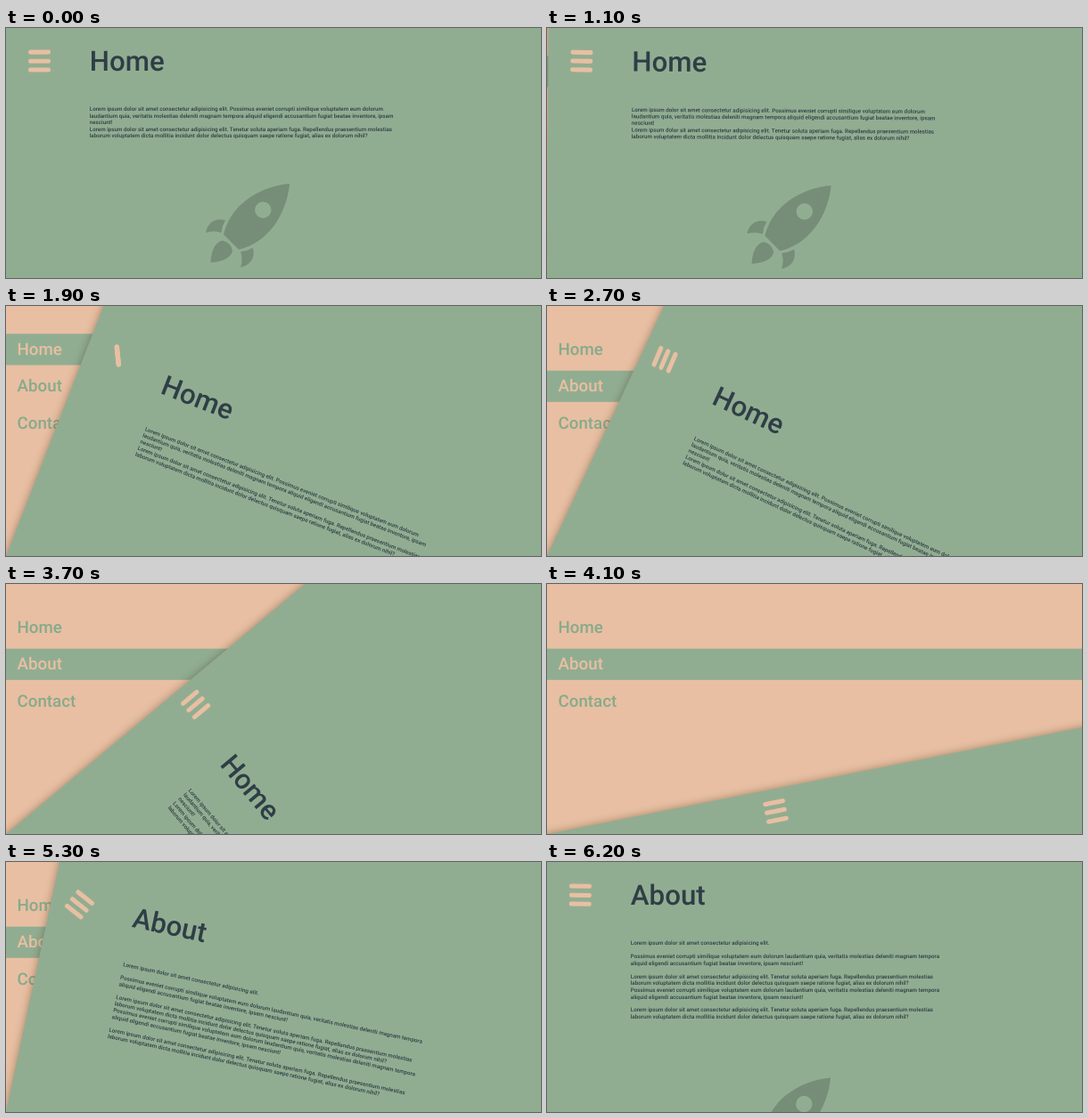
Animation of 600 by 281 pixels, one loop 6.3 s. Source, as an HTML page:

```html
<!DOCTYPE html>
<html lang="en">
<head>
<meta charset="utf-8">
<title>Rotating page menu</title>
<style>
:root { --green: #91ad91; --peach: #e8bfa2; --ink: #2f3e46; }
html, body { margin: 0; width: 100%; height: 100%; overflow: hidden; background: var(--peach); }
#stage {
  position: absolute; left: 0; top: 0; width: 1536px; height: 720px; overflow: hidden;
  transform: scale(.390625); transform-origin: 0 0; background: var(--peach);
  font: 500 16px/1.2 Roboto, sans-serif; text-rendering: geometricPrecision;
}
nav { position: absolute; top: 80px; left: 0; width: 100%; }
nav div { height: 90px; margin-bottom: 15.5px; padding-left: 32px; font-size: 48px; line-height: 90px; color: #87aa8c; }
nav .on { background: var(--green); color: var(--peach); }
#page { position: absolute; inset: 0; transform-origin: 0 100%; color: var(--ink); }
#page::before {
  content: ""; position: absolute; inset: -2000px -2500px -1500px 0;
  background: var(--green); box-shadow: 0 0 24px rgba(60, 40, 20, .4);
}
#icon { position: absolute; left: 64px; top: 63px; width: 64px; height: 64px; transform-origin: 50% 0; }
#icon i { position: absolute; left: 0; top: 0; width: 64px; height: 13px; border-radius: 6px; background: var(--peach); }
h1 { position: absolute; left: 240px; top: 48px; margin: 0; font-size: 80px; font-weight: 500; line-height: 1.2; }
p { position: absolute; left: 240px; top: 224px; margin: 0; white-space: pre; }
svg { position: absolute; left: 0; top: 0; width: 1536px; height: 720px; overflow: visible; fill: #768d78; }
</style>
</head>
<body>
<div id="stage">
  <nav><div>Home</div><div>About</div><div>Contact</div></nav>
  <div id="page">
    <div id="icon"><i></i><i></i><i></i></div>
    <h1></h1>
    <p></p>
    <svg viewBox="0 0 600 281.25">
      <path fill-rule="evenodd" d="M318 175C285 178 252 198 244 232L261 249C295 241 315 208 318 175ZM297.5 204.5a9.2 9.2 0 1 0-18.4 0a9.2 9.2 0 1 0 18.4 0Z"/>
      <path d="M224 230C226 221 232 213 246 216Q242 223 241.5 230Q233 227 224 230Z"/>
      <path d="M263 269C272 267 280 261 277 247Q270 251 263 251.5Q266 260 263 269Z"/>
      <path d="M229.5 263.5C230 250 235 240 243 239Q252 241 254 250C253 258 243 263 229.5 263.5Z"/>
    </svg>
  </div>
</div>
<script>
const $ = s => document.querySelector(s);
const page = $('#page'), icon = $('#icon'), title = $('h1'), text = $('p'), rocket = $('svg');
const bars = [...icon.children], items = [...$('nav').children];

const LOOP = 6300;
const lorem = 'Lorem ipsum dolor sit amet consectetur adipisicing elit.';
const tenetur = lorem + ' Tenetur soluta aperiam fuga. Repellendus praesentium molestias\n' +
  'laborum voluptatem dicta mollitia incidunt dolor delectus quisquam saepe ratione fugiat, alias ex dolorum nihil?';
const possimus = 'Possimus eveniet corrupti similique voluptatem eum dolorum laudantium quia, veritatis molestias deleniti magnam tempora\n' +
  'aliquid eligendi accusantium fugiat beatae inventore, ipsam nesciunt!';
const block = [lorem, possimus, tenetur].join('\n\n');
const pages = {
  Home: lorem + ' Possimus eveniet corrupti similique voluptatem eum dolorum\n' +
    'laudantium quia, veritatis molestias deleniti magnam tempora aliquid eligendi accusantium fugiat beatae inventore, ipsam\n' +
    'nesciunt!\n' + tenetur,
  About: block + '\n' + block.slice(lorem.length + 2)
};

// Motion advances in 100 ms steps inside these spans and rests between them.
const spans = [[1100, 1900], [2100, 3100], [3400, 4500], [4700, 4800],
  [5000, 5100], [5300, 5500], [5700, 5900], [6100, 6200]];
function snap(t) {
  let s = 0;
  for (const [a, b] of spans) if (t >= a) s = Math.min(Math.floor(t / 100) * 100, b);
  return s;
}

// CSS "ease": cubic-bezier(.25, .1, .25, 1)
function ease(x) {
  if (x <= 0) return 0;
  if (x >= 1) return 1;
  const curve = (u, a, b) => 3 * (1 - u) ** 2 * u * a + 3 * (1 - u) * u * u * b + u ** 3;
  let lo = 0, hi = 1;
  for (let i = 0; i < 30; i++) {
    const u = (lo + hi) / 2;
    if (curve(u, .25, .25) < x) lo = u; else hi = u;
  }
  return curve(lo, .1, 1);
}
const tween = (t, start, length) => ease((t - start) / length);

let shown;
function show(name) {
  if (name === shown) return;
  shown = name;
  title.textContent = name;
  text.textContent = pages[name];
  rocket.style.top = name === 'About' ? '172.8px' : 0;
}

function draw(now) {
  const t = snap(now % LOOP);
  const angle = (25 * tween(t, 1060, 1520) + 65 * tween(t, 3365, 1400)) * (1 - tween(t, 4536, 1333));
  const spin = 90 * (tween(t, 1060, 2040) - tween(t, 4510, 1900));
  const u = (t - 1060) / 2040;
  const gap = 25.5 * (u < .5 ? 1 - ease(2 * u) : ease(2 * u - 1));

  page.style.transform = `rotate(${angle}deg)`;
  icon.style.transform = `rotate(${spin}deg)`;
  bars.forEach((b, i) => b.style.top = i * gap + 'px');
  items.forEach((el, i) => el.className = i === (t < 2400 ? 0 : 1) ? 'on' : '');
  show(t < 4500 ? 'Home' : 'About');
}

const start = performance.now();
function tick() {
  draw(performance.now() - start);
  requestAnimationFrame(tick);
}
tick();
</script>
</body>
</html>
```
